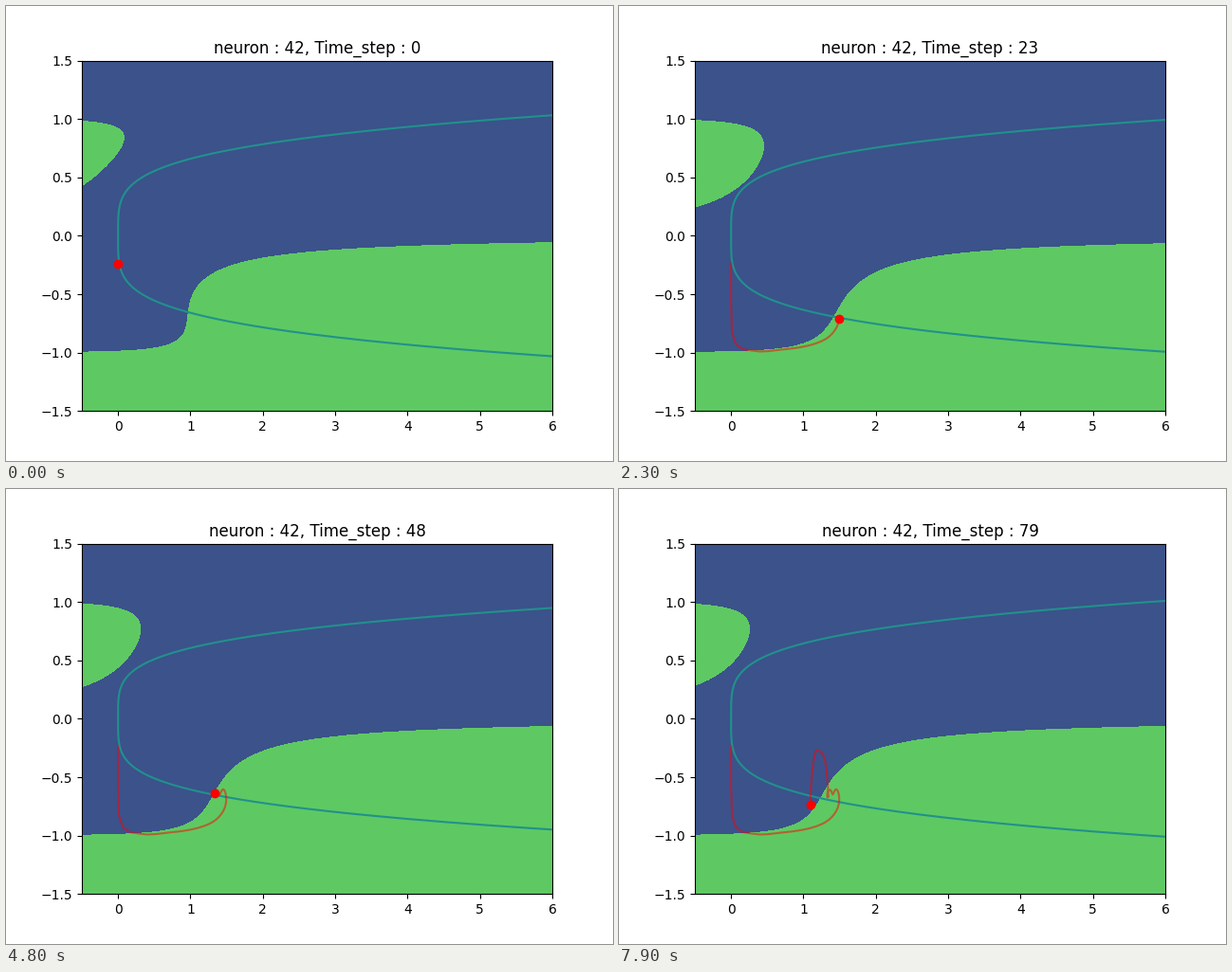
Animation, 640 px wide and 480 px high, one loop 8000 ms. Source, as a matplotlib script:

```python
import numpy as np
import matplotlib.pyplot as plt
from matplotlib.animation import FuncAnimation

STEPS = 80
BIAS = -0.345
RATE = 0.0195  # speed of the slow variable
BLUE, TEAL, GREEN = "#3b528b", "#21918c", "#5ec962"


def smooth(t, tk, yk):
    """Cubic Hermite curve through the key points (tk, yk)."""
    tk, yk = np.asarray(tk), np.asarray(yk)
    i = np.clip(np.searchsorted(tk, t, side="right") - 1, 0, len(tk) - 2)
    m = np.gradient(yk, tk)
    h = tk[i + 1] - tk[i]
    s = (t - tk[i]) / h
    return ((1 + 2 * s) * (1 - s) ** 2 * yk[i] + s * (1 - s) ** 2 * h * m[i]
            + s * s * (3 - 2 * s) * yk[i + 1] + s * s * (s - 1) * h * m[i + 1])


steps = np.arange(STEPS)

# Input-driven modulation of both nullclines
turns = [0, 4, 23, 48, 60, 79]
base = np.interp(steps, turns, [1.17, 1.838, 1.885, 1.745, 1.755, 1.688])
gain = np.interp(steps, turns, [5.29, 6.8, 6.17, 7.4, 7.03, 5.77])
cubic = 0.57 + 0.53 * np.exp(-steps)

# Fast variable: sharp drop, slow return, two ripples, then a spike
fast = smooth(
    steps,
    [0, 1, 2, 3, 5, 9, 12, 16, 20, 23, 29, 35, 42, 48, 53, 60,
     63, 66, 69, 72, 75, 79],
    [-.24, -.58, -.83, -.93, -.982, -.972, -.947, -.885, -.785, -.711, -.605,
     -.648, -.608, -.636, -.672, -.662, -.66, -.62, -.35, -.28, -.30, -.735])

# Slow variable relaxes towards its own nullcline
slow = np.zeros(STEPS)
for n in steps[:-1]:
    slow[n + 1] = slow[n] + RATE * (gain[n] * fast[n] ** 4 - slow[n])

X, V = np.meshgrid(np.linspace(-0.5, 6, 400), np.linspace(-1.5, 1.5, 400))
v = np.linspace(-1.5, 1.5, 601)

fig, ax = plt.subplots(figsize=(6.4, 4.8), dpi=100)


def draw(n):
    ax.clear()
    drift = np.tanh(BIAS + (base[n] + cubic[n] * V**2 - X) * V) - V
    ax.contourf(X, V, drift, levels=[-10, 0, 10], colors=[BLUE, GREEN])
    ax.plot(gain[n] * v**4, v, color=TEAL, lw=1.5)
    ax.plot(slow[:n + 1], fast[:n + 1], color="red", alpha=0.5, lw=1.5)
    ax.plot(slow[n], fast[n], "ro")
    ax.set_xlim(-0.5, 6)
    ax.set_ylim(-1.5, 1.5)
    ax.set_title(f"neuron : 42, Time_step : {n}")
    return []


anim = FuncAnimation(fig, draw, frames=STEPS, interval=100,
                     init_func=lambda: [], repeat=True, repeat_delay=0)
plt.show()
```
